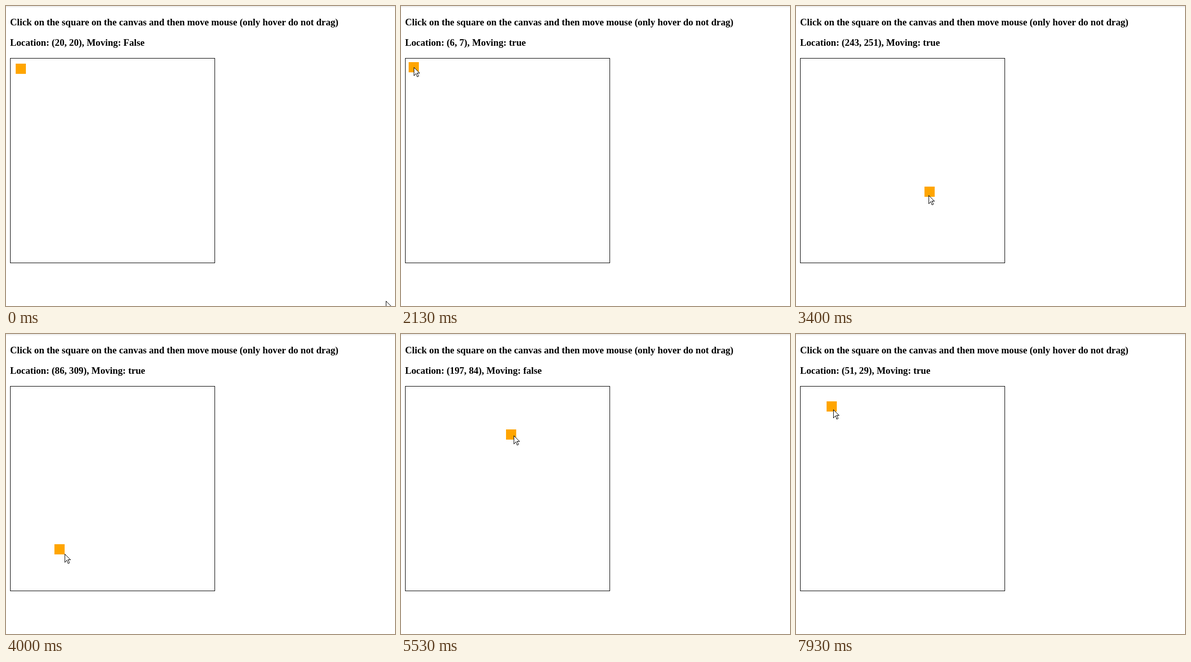
An HTML page for the animation above (8 s loop, 763 by 588 pixels).

```html
<!DOCTYPE html>
<html lang="en">
<head>
<meta charset="utf-8">
<title>Hover to move</title>
<style>
  html, body { margin: 0; width: 100%; height: 100%; overflow: hidden; background: #fff; }
  h3 { position: absolute; left: 8px; margin: 0; white-space: pre;
       font: bold 18.72px/21px "Liberation Serif", "Times New Roman", serif; }
  svg { position: absolute; left: 0; top: 0; }
</style>
</head>
<body>
<h3 style="top: 21px">Click on the square on the canvas and then move mouse (only hover do not drag)</h3>
<h3 style="top: 61px" id="status"></h3>
<svg width="763" height="588" shape-rendering="crispEdges">
  <rect y="1" width="763" height="1" fill="#dadada"/>
  <rect x="8.5" y="102.5" width="401" height="401" fill="none" stroke="#000"/>
  <rect id="box" width="20" height="20" fill="#ffa500"/>
  <path id="arrow" d="M.5 .5V16.5L4.5 12.5L7 18.5H8.5L9.5 17L7 11.5H11.5Z" fill="#fff" stroke="#000"/>
</svg>
<script>
const LOOP = 8000, TICK = 1000 / 15;
const CANVAS = { x: 9, y: 103 };

// Ticks at which the square is clicked, starts to follow, is dropped and taken again
const CLICK = 26, FOLLOW = 32, DROP = 80, REGRAB = 108;

// Free lap of the pointer after the drop, ending where it began
const LAP = { from: 82, to: 102, x: 156, y: 284, rx: 128, ry: 99, angle: -62 };

// Turning points of the pointer: tick, x, y
const path = [
  [0, 745, 578], [13, 49, 187], [14, 34, 146], [17, 25, 120], [FOLLOW, 25, 120],
  [38, 137, 166], [39, 148, 173], [46, 282, 320], [50, 262, 364], [51, 260, 371],
  [57, 97, 406], [62, 140, 440], [67, 333, 294], [68, 344, 273], [70, 345, 224],
  [76, 216, 197], [REGRAB, 216, 197], [118, 70, 142], [119, 73, 148]
];

const smooth = u => u * u * (3 - 2 * u);

const slope = (i, axis) =>
  path[i] && path[i + 1] ? (path[i + 1][axis] - path[i][axis]) / (path[i + 1][0] - path[i][0]) : 0;

// Harmonic mean of neighbouring slopes: smooth, without overshoot
function tangent(i, axis) {
  const a = slope(i - 1, axis), b = slope(i, axis);
  return a * b > 0 ? 2 * a * b / (a + b) : 0;
}

function drag(tick) {
  let i = 0;
  while (i < path.length - 2 && path[i + 1][0] <= tick) i++;
  const span = path[i + 1][0] - path[i][0];
  const u = (tick - path[i][0]) / span;
  return [1, 2].map(axis => {
    const p = path[i][axis], q = path[i + 1][axis];
    const bend = u * (1 - u) * span * ((1 - u) * tangent(i, axis) - u * tangent(i + 1, axis));
    return Math.round(p + (q - p) * smooth(u) + bend);
  });
}

function pointer(tick) {
  const u = (tick - LAP.from) / (LAP.to - LAP.from);
  if (u <= 0 || u >= 1) return drag(tick);
  const a = (LAP.angle + 360 * smooth(u)) * Math.PI / 180;
  return [Math.round(LAP.x + LAP.rx * Math.cos(a)), Math.round(LAP.y + LAP.ry * Math.sin(a))];
}

// The square trails the drag by one tick
function square(tick) {
  if (tick < FOLLOW) return [10, 10];
  const [x, y] = drag(tick - 1);
  return [x - CANVAS.x - 10, y - CANVAS.y - 10];
}

const [label, box, arrow] = ["status", "box", "arrow"].map(id => document.getElementById(id));
const place = (node, x, y) => node.setAttribute("transform", `translate(${x} ${y})`);

function draw(now) {
  const tick = Math.floor((now % LOOP + 4) / TICK) % 120;
  const [x, y] = square(tick);
  const moving = tick >= CLICK && tick < DROP || tick >= REGRAB;
  place(arrow, ...pointer(tick));
  place(box, CANVAS.x + x, CANVAS.y + y);
  label.textContent = tick < CLICK
    ? "Location: (20, 20), Moving: False"
    : `Location: (${x}, ${y}), Moving: ${moving}`;
}

let start;
function loop(now) {
  start ??= now;
  draw(now - start);
  requestAnimationFrame(loop);
}
draw(0);
requestAnimationFrame(loop);
</script>
</body>
</html>
```
